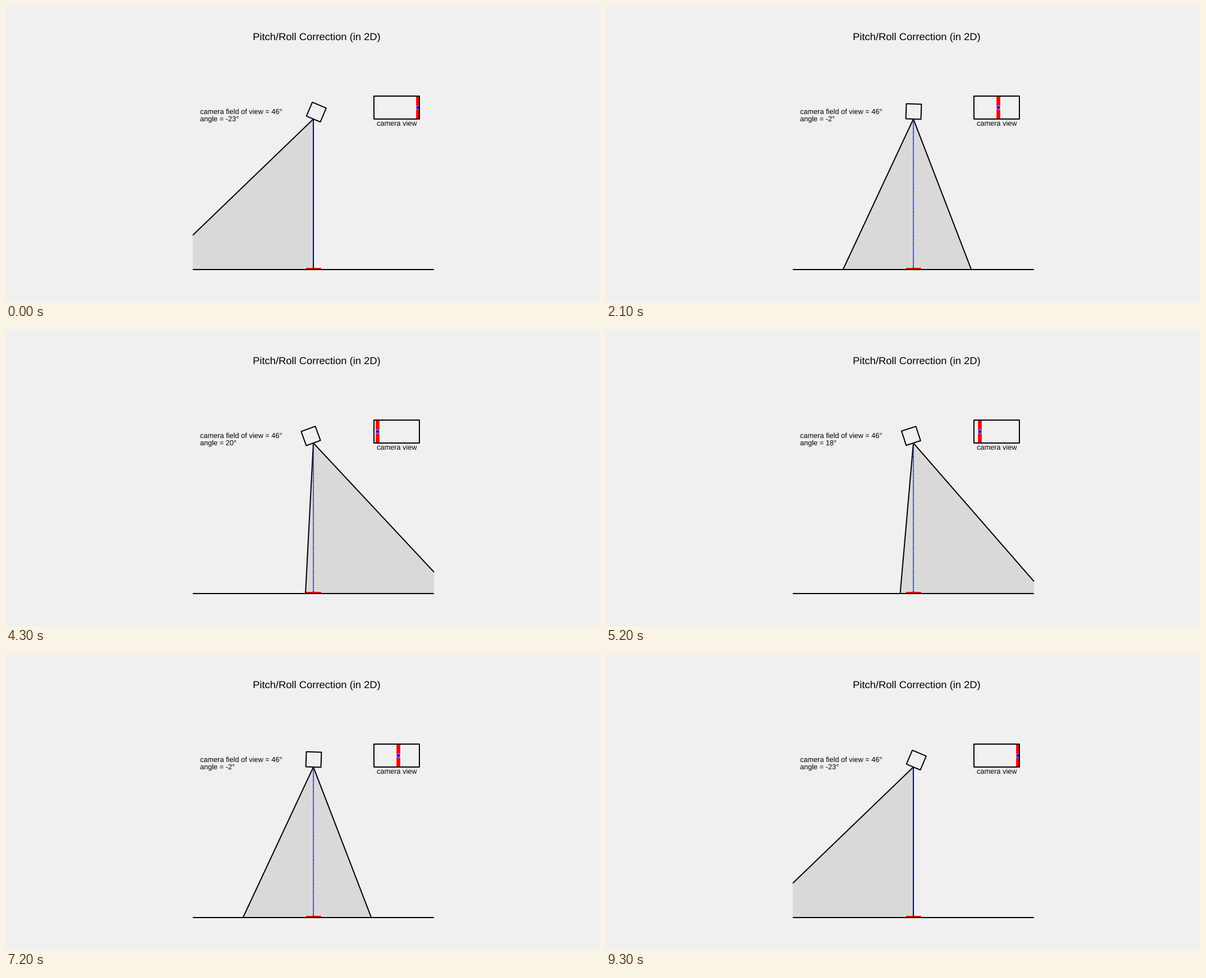
A matplotlib script that plays this animation: 1059 by 529 pixels, repeating every 9400 ms.

```python
import math

import matplotlib.pyplot as plt
from matplotlib.animation import FuncAnimation
from matplotlib.patches import Polygon, Rectangle

W, H, DPI = 1059, 529, 72  # at 72 dpi one point is one pixel
FRAMES, INTERVAL = 94, 100

APEX_X, APEX_Y = 548, 202
GROUND = 471
LEFT, RIGHT = 333, 763
HALF_FOV = 23
SIDE = 26.9
VIEW_X, VIEW_Y, VIEW_W, VIEW_H = 656, 161, 81, 41
VIEW_MID, PX_PER_DEGREE = 695.5, 5 / 3

plt.rcParams["font.family"] = "Liberation Sans"
plt.rcParams["text.hinting"] = "none"
plt.rcParams["toolbar"] = "None"

fig = plt.figure(figsize=((W + 1e-6) / DPI, (H + 1e-6) / DPI), dpi=DPI,
                 facecolor="#f0f0f0")
ax = fig.add_axes([0, 0, 1, 1])
ax.set_xlim(0, W)
ax.set_ylim(H, 0)
ax.axis("off")


def line(xs, ys, color="black", width=2, z=3, **style):
    style.setdefault("solid_capstyle", "butt")
    return ax.plot(xs, ys, color=color, lw=width, zorder=z, **style)[0]


def label(x, y, text, size=12.75, align="left"):
    return ax.text(x, y, text, size=size, ha=align, va="baseline")


label(553.7, 60.3, "Pitch/Roll Correction (in 2D)", 18.35, "center")
label(346, 193, "camera field of view = 46°")
label(696.5, 213.7, "camera view", align="center")
angle_text = label(346, 206.3, "")

# Scene
wedge = ax.add_patch(Polygon([(0, 0)] * 3, fc="#d9d9d9", ec="none", zorder=1))
ax.add_patch(Rectangle((534.5, 468), 27, 3, fc="red", ec="none", zorder=3))
line([LEFT, RIGHT], [GROUND, GROUND], z=4)
rays = [line([], []) for _ in range(2)]
line([APEX_X, APEX_X], [APEX_Y, GROUND], "blue", z=5,
     linestyle=(0, (1, 0.65)), dash_capstyle="butt")
body = ax.add_patch(Polygon([(0, 0)] * 4, fc="none", ec="black", lw=2,
                            joinstyle="round", zorder=4))

# Camera view inset
frame = ax.add_patch(Rectangle((VIEW_X, VIEW_Y), VIEW_W, VIEW_H, fc="none",
                               ec="black", lw=2, joinstyle="round", zorder=8))
bar = line([], [], "red", 6.67, z=6)
dot = line([], [], "blue", z=7, marker="o", markersize=6.7,
           markeredgecolor="white", markeredgewidth=0.67)
for part in (bar, dot):
    part.set_clip_path(frame)


def ray_end(degrees):
    """Point where a ray meets the ground or the side of the scene."""
    slope = math.tan(math.radians(degrees))
    x = APEX_X + slope * (GROUND - APEX_Y)
    if LEFT <= x <= RIGHT:
        return x, GROUND
    x = LEFT if x < LEFT else RIGHT
    return x, APEX_Y + (x - APEX_X) / slope


def camera_corners(degrees):
    s, c = math.sin(math.radians(degrees)), math.cos(math.radians(degrees))
    local = [(-0.5, 0), (0.5, 0), (0.5, 1), (-0.5, 1)]
    return [(APEX_X + SIDE * (u * c - v * s), APEX_Y - SIDE * (u * s + v * c))
            for u, v in local]


def update(i):
    angle = i - HALF_FOV if i < FRAMES // 2 else 70 - i
    ends = [ray_end(angle - HALF_FOV), ray_end(angle + HALF_FOV)]
    for ray, (x, y) in zip(rays, ends):
        ray.set_data([APEX_X, x], [APEX_Y, y])
    (x0, y0), (x1, y1) = ends
    wedge.set_xy([(APEX_X, APEX_Y), (x0, y0), (x0, GROUND),
                  (x1, GROUND), (x1, y1)])
    body.set_xy(camera_corners(angle))
    x = VIEW_MID - PX_PER_DEGREE * angle
    bar.set_data([x, x], [VIEW_Y, VIEW_Y + VIEW_H])
    dot.set_data([x], [VIEW_Y + VIEW_H / 2])
    angle_text.set_text(f"angle = {angle}°")
    return [wedge, *rays, body, bar, dot, angle_text]


animation = FuncAnimation(fig, update, frames=FRAMES, interval=INTERVAL,
                          repeat=True, repeat_delay=0)
plt.show()
```
